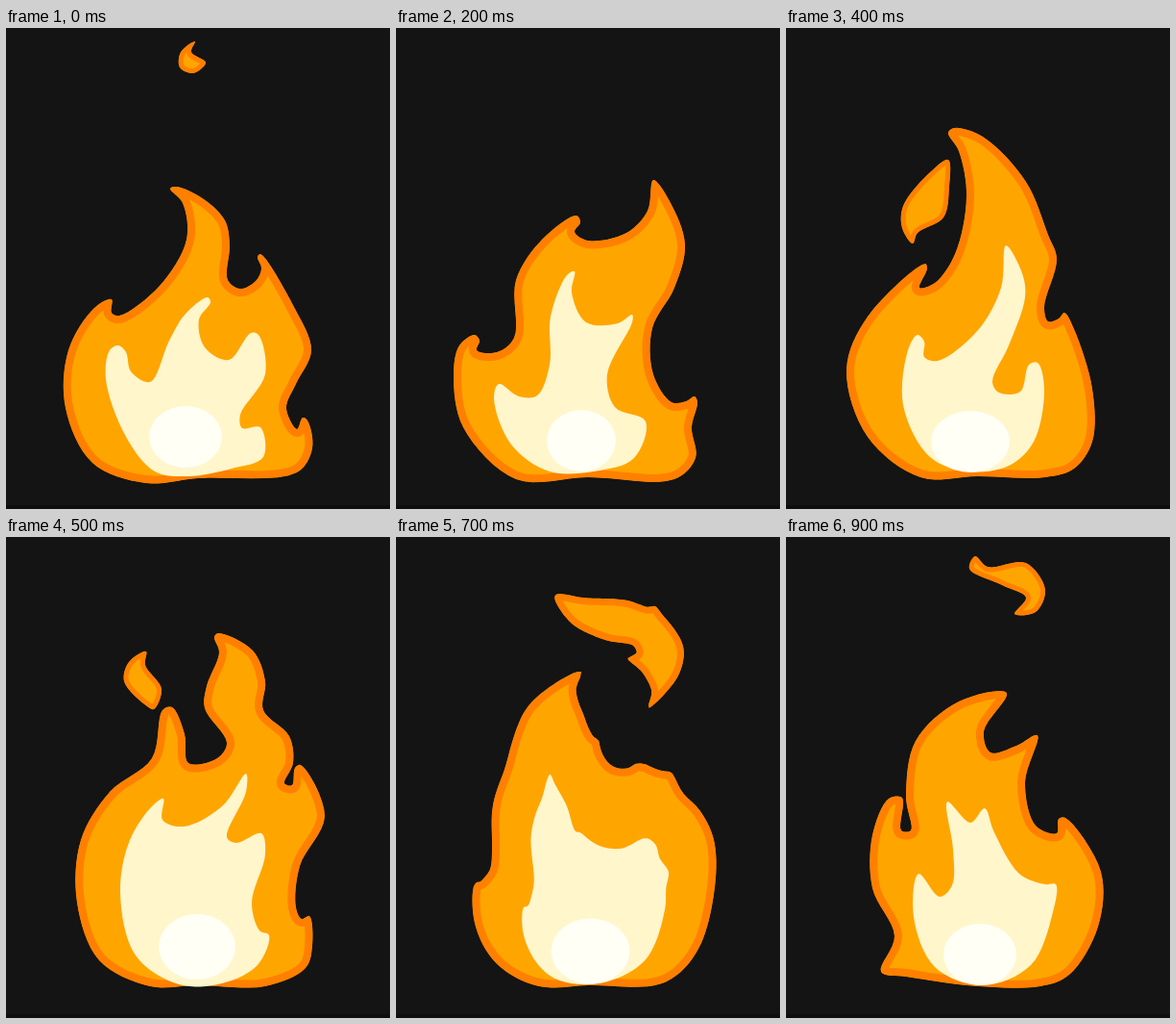
Animation of 400 by 500 pixels, one loop 1 s. Source, as an HTML page with a canvas:

```html
<!DOCTYPE html>
<html lang="en">
<head>
<meta charset="utf-8">
<title>Flame</title>
<style>
html, body { margin: 0; width: 100%; height: 100%; overflow: hidden; background: #141414; }
canvas { display: block; }
</style>
</head>
<body>
<canvas id="stage" width="400" height="500"></canvas>
<script>
const STEP = 100;
const COUNT = 10;
const ctx = document.getElementById('stage').getContext('2d');
const dist = (a, b) => Math.hypot(a[0] - b[0], a[1] - b[1]);
const mix = (a, b, t) => [a[0] + (b[0] - a[0]) * t, a[1] + (b[1] - a[1]) * t];

// Closed centripetal spline through a few points, as a fine polyline.
function outline(text) {
  const pts = text.split(' ').map(p => p.split(',').map(Number));
  const n = pts.length;
  const line = [];
  pts.forEach((b, i) => {
    const a = pts[(i + n - 1) % n], c = pts[(i + 1) % n], d = pts[(i + 2) % n];
    const u = Math.sqrt(dist(a, b)), v = Math.sqrt(dist(b, c)), w = Math.sqrt(dist(c, d));
    const handle = (near, far, other, s) => near.map((p, k) =>
      (s * s * far[k] - v * v * other[k] + (2 * s * s + 3 * s * v + v * v) * p) / (3 * s * (s + v)));
    const h1 = handle(b, c, a, u), h2 = handle(c, b, d, w);
    for (let t = 0; t < 1; t += 0.125) {
      const ab = mix(b, h1, t), bc = mix(h1, h2, t), cd = mix(h2, c, t);
      line.push(mix(mix(ab, bc, t), mix(bc, cd, t), t));
    }
  });
  return line;
}

// Evenly spaced points along an open line.
function even(line, n) {
  const sums = [0];
  for (let i = 1; i < line.length; i++) sums.push(sums[i - 1] + dist(line[i - 1], line[i]));
  const total = sums[sums.length - 1];
  let k = 1;
  return Array.from({ length: n }, (_, i) => {
    const s = total * i / n;
    while (sums[k] < s) k++;
    return mix(line[k - 1], line[k], (s - sums[k - 1]) / (sums[k] - sums[k - 1]));
  });
}

// Tip to base, then base back to tip.
function sides(line) {
  const base = [200, 470];
  let low = 0;
  line.forEach((p, i) => { if (dist(p, base) < dist(line[low], base)) low = i; });
  return [...even(line.slice(0, low + 1), 100), ...even([...line.slice(low), line[0]], 100)];
}

function blend(a, b) {
  const to = sides(b);
  return sides(a).map((p, i) => mix(p, to[i], 0.5));
}

const poses = [];

function pose(step, body, heart, core, ...embers) {
  poses[step] = { body: outline(body), heart: outline(heart), core, embers: embers.map(outline) };
}

function between(step) {
  const a = poses[step - 1], b = poses[step + 1];
  const pairs = Math.min(a.embers.length, b.embers.length);
  poses[step] = {
    body: blend(a.body, b.body),
    heart: blend(a.heart, b.heart),
    core: a.core.map((v, i) => (v + b.core[i]) / 2),
    embers: a.embers.slice(0, pairs).map((e, i) => blend(e, b.embers[i]))
  };
}

// Each shape starts at its main tip.
pose(0,
  '178,165 206,178 228,200 233,225 231,262 244,271 260,263 266,250 262,238 265,235 300,290 318,335 302,370 292,395 303,417 309,405 314,408 319,437 303,462 200,468 145,473 90,452 62,395 65,335 92,291 110,282 110,296 118,299 160,268 188,220 184,182 171,167',
  '210,280 213,285 201,303 207,332 232,345 255,317 263,319 270,360 244,402 246,416 265,415 268,446 235,458 190,466 155,461 125,425 104,365 108,335 117,330 125,337 130,357 150,368 170,325 187,297',
  [187, 425, 38, 32],
  '197,14 193,25 208,36 195,47 181,41 182,25');

pose(2,
  '268,158 285,180 301,225 290,270 267,312 268,360 287,389 302,388 311,383 314,389 308,415 312,447 290,469 200,467 125,469 70,415 60,360 66,330 82,319 87,325 84,335 105,337 123,322 125,262 152,220 188,195 192,202 186,212 200,221 240,213 262,190',
  '186,253 183,275 198,306 231,307 246,298 246,306 220,360 228,394 260,409 248,447 212,460 160,461 120,433 102,385 107,370 128,383 147,382 160,350 161,300 178,257',
  [193, 429, 36, 32]);

pose(4,
  '175,104 205,113 250,160 273,215 282,240 269,290 273,305 284,302 290,296 300,313 319,375 319,430 300,458 270,467 200,466 140,467 85,425 63,355 85,300 145,245 147,250 139,270 155,265 176,235 188,175 180,128 169,109',
  '229,226 246,255 249,280 232,330 215,368 222,379 244,378 253,350 262,348 269,375 258,430 232,455 190,461 150,446 122,392 128,332 137,319 144,326 144,342 158,346 200,314 224,270',
  [192, 430, 41, 32],
  '169,137 150,150 122,185 121,208 132,224 137,213 164,197 170,165');

pose(5,
  '221,100 257,118 270,150 268,180 295,207 299,235 290,256 298,258 301,240 307,237 332,290 306,342 302,385 308,397 316,394 319,425 312,448 270,467 200,466 150,467 97,440 74,380 78,315 108,265 152,230 163,180 173,177 186,205 190,235 220,230 230,214 207,178 209,155 222,120 217,104',
  '250,246 250,265 230,312 240,318 266,308 270,330 256,380 264,409 274,414 262,445 225,464 180,465 135,435 119,370 129,315 153,279 164,272 163,294 185,301 225,280',
  [199, 426, 40, 34],
  '146,119 128,130 123,150 147,176 154,179 162,158 145,133');

pose(6,
  '164,153 162,172 203,197 203,213 189,237 200,254 230,257 246,235 240,200 250,195 273,222 283,265 304,279 325,310 329,365 315,425 278,462 200,465 145,467 102,435 82,365 95,305 127,262 130,240 124,198 145,167',
  '161,262 182,293 182,330 200,343 233,338 248,309 254,309 259,338 281,346 279,363 282,385 262,442 205,464 145,443 120,385 130,340 148,303 160,285',
  [203, 428, 42, 35],
  '172,59 200,73 260,79 300,107 312,150 285,219 289,195 262,170 238,154 268,150 265,139 225,138 180,112 166,66',
  '145,94 157,108 156,123 143,133 133,122 145,108');

pose(8,
  '222,127 198,165 193,188 206,195 231,178 223,215 250,263 280,280 296,270 292,256 297,249 331,295 338,345 313,435 280,465 200,467 150,467 95,438 72,388 78,345 86,342 92,351 113,343 114,320 96,255 103,208 120,180 175,141',
  '160,231 161,243 193,286 199,280 220,302 265,318 287,317 279,385 255,440 205,466 158,458 135,405 144,373 155,382 165,358 141,300 145,255',
  [202, 433, 40, 33],
  '161,61 175,54 225,54 250,60 256,52 262,63 287,90 280,118 240,136 251,110 215,78');

pose(9,
  '230,162 206,202 213,224 240,217 262,206 249,255 260,300 282,308 284,293 291,292 328,348 325,405 295,455 265,467 200,467 125,457 99,452 113,415 90,365 90,310 107,272 121,271 120,305 130,305 125,270 135,212 180,171',
  '168,275 192,297 207,282 216,305 243,350 270,361 281,361 278,390 255,445 205,466 155,447 133,395 138,350 160,374 173,362 174,325',
  [202, 434, 38, 32],
  '197,20 210,31 250,27 270,55 260,78 238,80 250,63 225,50 191,33');

[1, 3, 7].forEach(between);

function trace(line) {
  ctx.beginPath();
  line.forEach(p => ctx.lineTo(...p));
  ctx.closePath();
}

// Orange fill with a darker rim kept inside the outline.
function flame(line, rim) {
  ctx.save();
  trace(line);
  ctx.clip();
  ctx.fillStyle = '#ffa500';
  ctx.fill();
  ctx.strokeStyle = '#ff8000';
  ctx.lineWidth = rim * 2;
  ctx.lineJoin = 'round';
  ctx.stroke();
  ctx.restore();
}

function draw({ body, heart, core, embers }) {
  ctx.fillStyle = '#141414';
  ctx.fillRect(0, 0, 400, 500);
  ctx.fillStyle = '#0e0e0e';
  ctx.fillRect(0, 496, 400, 4);
  flame(body, 8);
  embers.forEach(e => flame(e, e.length > 80 ? 7 : 5));
  ctx.fillStyle = '#fff6cb';
  trace(heart);
  ctx.fill();
  ctx.fillStyle = '#fffff6';
  ctx.beginPath();
  ctx.ellipse(...core, 0, 0, Math.PI * 2);
  ctx.fill();
}

let shown = -1;
function tick() {
  const i = Math.floor(performance.now() / STEP) % COUNT;
  if (i !== shown) draw(poses[shown = i]);
  requestAnimationFrame(tick);
}
tick();
</script>
</body>
</html>
```
